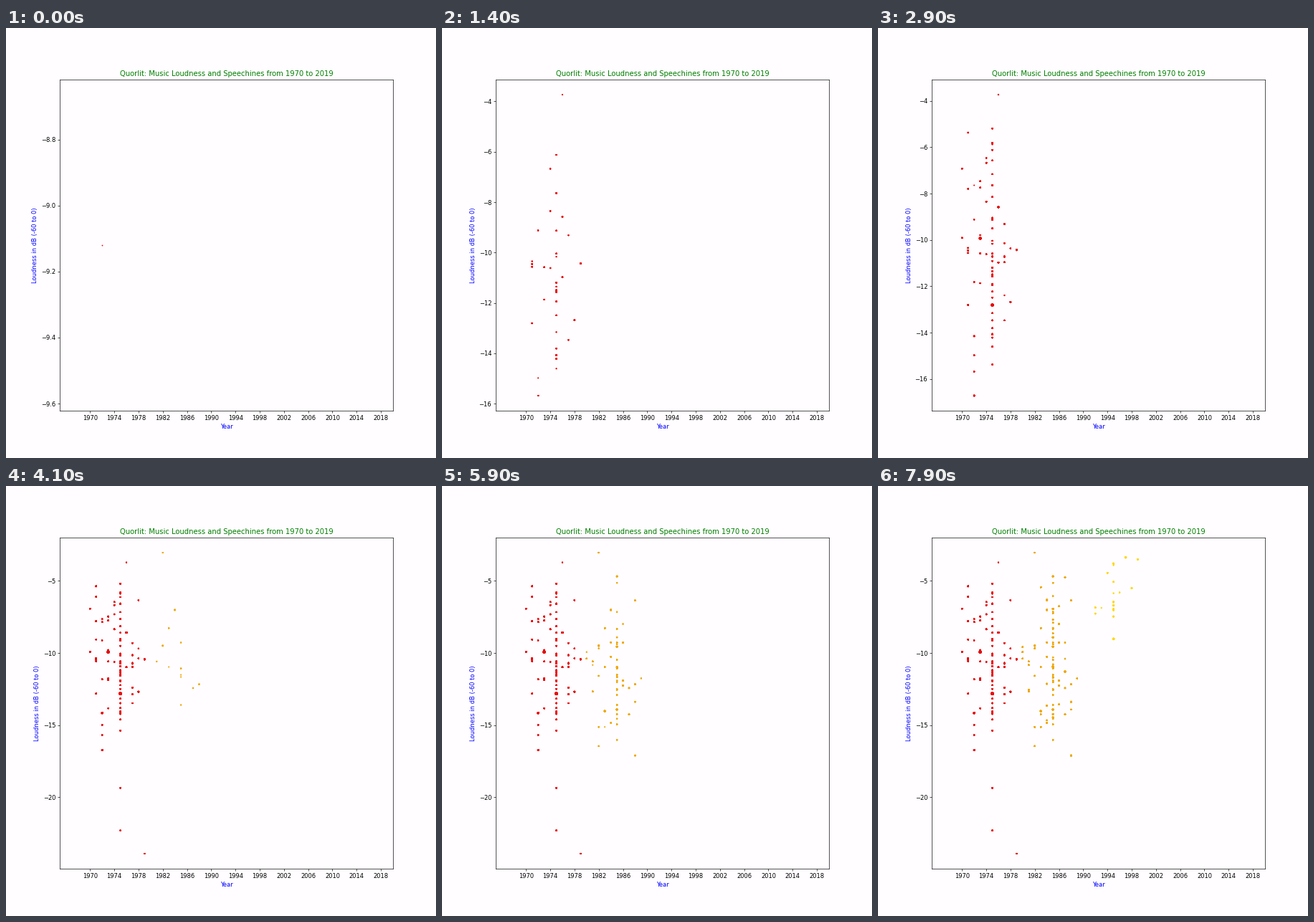
Write a matplotlib script that moves like this. It is 600 px wide and 600 px high and loops after 8000 ms.

```python
import random

import matplotlib.pyplot as plt
import numpy as np
from matplotlib.animation import FuncAnimation

FRAMES, INTERVAL = 80, 100
PAPER = "#fffdff"
STEPS_PER_DECADE = 36
BASE_SIZE = 2.0    # marker area of a song with little speech
MID_DECADE = 0.4   # share of songs dated to the middle of their decade
MAX_LAYERS = 20    # songs are plotted again each step, which firms up their edges

# First year, colour, loudness range, mean extra size from speech
DECADES = [
    (1970, "#e8080a", (-15.5, -4.0), 0.9),
    (1980, "#f0a808", (-17.0, -4.0), 0.9),
    (1990, "#ffd700", (-9.5, -3.1), 2.5),
]

# Songs that set the axis range or stand out: step, year, loudness, size
KEY_SONGS = [
    (0, 1972, -9.12, 1.3),
    (1, 1972, -15.68, 2),
    (1, 1975, -6.12, 2),
    (12, 1976, -3.73, 2),
    (19, 1972, -16.72, 4),
    (24, 1973, -9.93, 14),
    (26, 1975, -12.81, 18),
    (31, 1975, -19.35, 2),
    (33, 1975, -22.29, 2),
    (35, 1979, -23.9, 2),
    (38, 1982, -3.04, 2),
    (55, 1988, -17.1, 4),
    (75, 1995, -9.02, 9),
    (77, 1999, -3.51, 5),
]


def decade_at(step):
    return DECADES[max(step - 1, 0) // STEPS_PER_DECADE]


def random_song(rng, step):
    """A typical song of its decade that leaves the axis range unchanged."""
    start, _, (quiet, loud), speech = decade_at(step)
    seen = [song[2] for song in KEY_SONGS if song[0] <= step]
    low, high = max(quiet, min(seen)), min(loud, max(seen))
    year = start + (5 if rng.random() < MID_DECADE else rng.randrange(10))
    size = BASE_SIZE + rng.expovariate(1 / speech)
    return step, year, rng.triangular(low, high), size


def make_songs(seed=7):
    """Two or three new songs arrive at every step after the first."""
    rng = random.Random(seed)
    songs = list(KEY_SONGS)
    for step in range(1, FRAMES):
        keys = sum(song[0] == step for song in KEY_SONGS)
        for _ in range(2 + step % 2 - keys):
            songs.append(random_song(rng, step))
    return sorted(songs)


songs = make_songs()
births, years, louds, sizes = np.array(songs).T
births = births.astype(int)
colours = np.array([decade_at(step)[1] for step in births])

fig, ax = plt.subplots(figsize=(10, 10), dpi=60, facecolor=PAPER)
ax.set_facecolor(PAPER)
ax.set_xlim(1965, 2020)
ax.set_xticks(range(1970, 2020, 4))
ax.set_title("Quorlit: Music Loudness and Speechines from 1970 to 2019",
             color="green")
ax.set_xlabel("Year", color="blue")
ax.set_ylabel("Loudness in dB (-60 to 0)", color="blue")
dots = ax.scatter([], [])


def fit_y(values):
    """Fit the y axis to the songs seen so far, with a 5% margin."""
    lo, hi = values.min(), values.max()
    if lo == hi:
        lo, hi = lo - 0.05 * abs(lo), hi + 0.05 * abs(hi)
    pad = 0.05 * (hi - lo)
    ax.set_ylim(lo - pad, hi + pad)


def draw(step):
    seen = np.flatnonzero(births <= step)
    layers = np.minimum(step - births[seen] + 1, MAX_LAYERS)
    idx = np.repeat(seen, layers)
    dots.set_offsets(np.column_stack([years[idx], louds[idx]]))
    dots.set_sizes(sizes[idx], fig.dpi)
    dots.set_color(list(colours[idx]))
    fit_y(louds[seen])
    return [dots]


anim = FuncAnimation(fig, draw, frames=FRAMES, interval=INTERVAL,
                     init_func=lambda: draw(0), repeat=True, repeat_delay=0)
plt.show()
```
